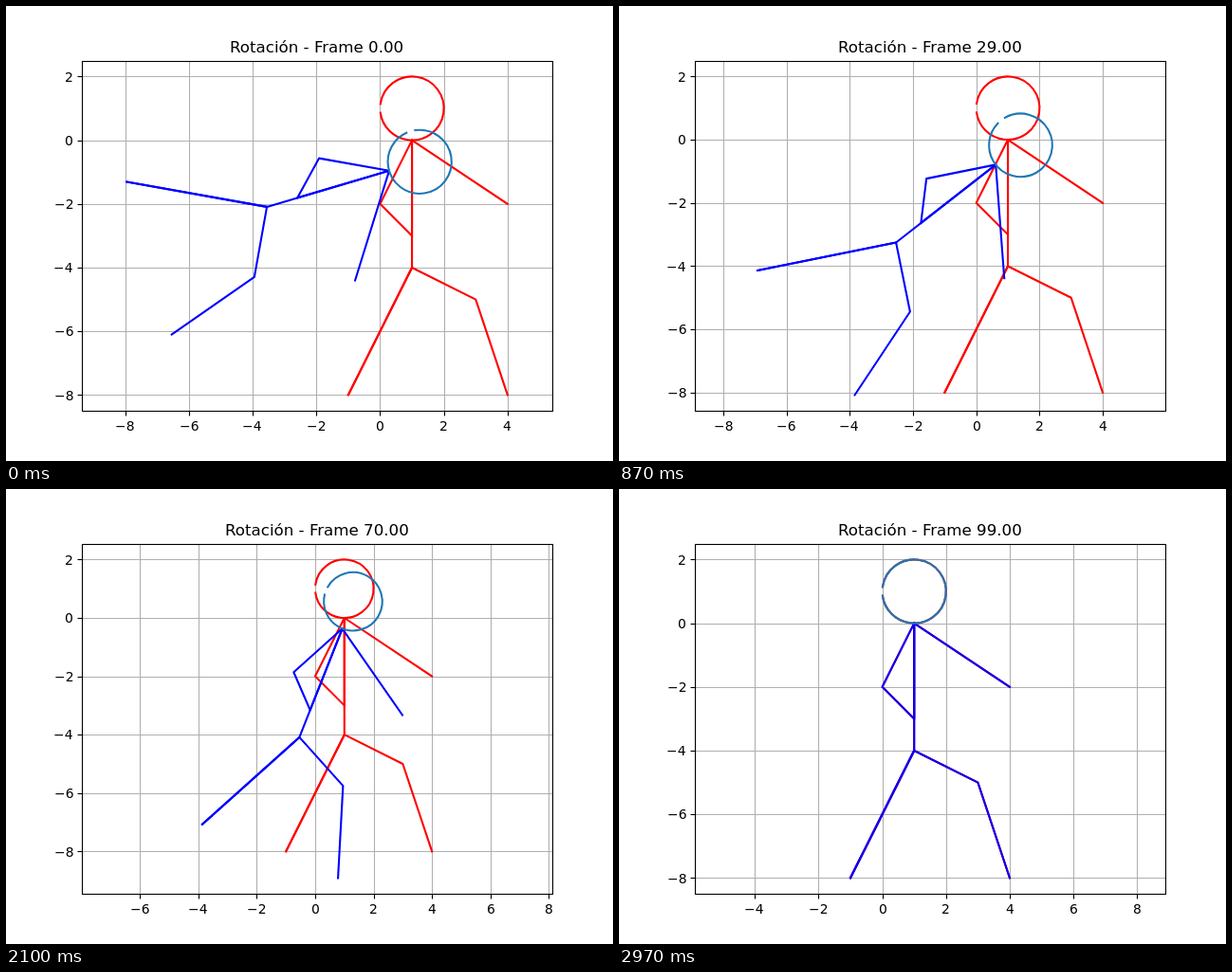
Write an HTML page with a canvas that moves like this. It is 640 px wide and 480 px high and loops after 3 s.

```html
<!DOCTYPE html>
<html lang="es">
<head>
<meta charset="utf-8">
<title>Rotación</title>
<style>
  html, body { margin: 0; width: 100%; height: 100%; overflow: hidden; background: #fff; }
  canvas { display: block; }
</style>
</head>
<body>
<canvas id="stage" width="640" height="480"></canvas>
<script>
const ctx = document.getElementById('stage').getContext('2d');

const FRAMES = 100, STEP = 30;
const START = -73.55 * Math.PI / 180;
const BOX = { l: 80, r: 576, t: 57.6, b: 427.2 };
const PT = 100 / 72;
const FONT = '"DejaVu Sans", sans-serif';

const HAND = [4, -2], NECK = [1, 0], ELBOW = [0, -2], WRIST = [1, -3];
const HIP = [1, -4], FOOT = [-1, -8], KNEE = [3, -5], TOE = [4, -8];
const BODY = [HAND, NECK, ELBOW, WRIST, NECK, HIP, FOOT, HIP, KNEE, TOE];
const RETRACED = [[NECK, WRIST], [HIP, FOOT]];

const rotate = a => ([x, y]) => [
  x * Math.cos(a) - y * Math.sin(a),
  x * Math.sin(a) + y * Math.cos(a)
];

const snap = v => Math.floor(v + 0.5) + 0.5;

// Equal-aspect view: height fits the data, width is centred on it.
function makeView(points) {
  const xs = points.map(p => p[0]), ys = points.map(p => p[1]);
  const low = Math.min(...ys), high = 2;
  const pad = (high - low) * 0.05;
  const scale = (BOX.b - BOX.t) / (high - low + 2 * pad);
  const midX = (Math.min(...xs) + Math.max(...xs)) / 2;
  const mid = (BOX.l + BOX.r) / 2, half = (BOX.r - BOX.l) / 2 / scale;
  return {
    scale,
    x: v => mid + (v - midX) * scale,
    y: v => BOX.t + (high + pad - v) * scale,
    xTicks: evens(midX - half, midX + half),
    yTicks: evens(low - pad, high + pad)
  };
}

function evens(from, to) {
  const out = [];
  for (let v = Math.ceil(from / 2) * 2; v <= to; v += 2) out.push(v);
  return out;
}

function line(x1, y1, x2, y2) {
  ctx.beginPath();
  ctx.moveTo(x1, y1);
  ctx.lineTo(x2, y2);
  ctx.stroke();
}

// Places text by its inked width; align 0.5 centres it, 1 ends it at x.
function label(str, x, y, size, align) {
  ctx.font = `${size * PT}px ${FONT}`;
  const m = ctx.measureText(str);
  const w = m.actualBoundingBoxLeft + m.actualBoundingBoxRight;
  ctx.fillText(str, Math.round(x - w * align) + m.actualBoundingBoxLeft, Math.round(y));
}

const tickText = v => (v < 0 ? '\u2212' : '') + Math.abs(v);

function drawGrid(view) {
  ctx.lineWidth = 0.8 * PT;
  ctx.lineCap = 'butt';
  const top = snap(BOX.t), bottom = snap(BOX.b), left = snap(BOX.l), right = snap(BOX.r);
  for (const v of view.xTicks) {
    const x = snap(view.x(v));
    ctx.strokeStyle = '#b0b0b0';
    line(x, top, x, bottom);
    ctx.strokeStyle = '#000';
    line(x, bottom, x, bottom + 5);
    label(tickText(v), view.x(v), BOX.b + 20.7, 10, 0.5);
  }
  for (const v of view.yTicks) {
    const y = snap(view.y(v));
    ctx.strokeStyle = '#b0b0b0';
    line(left, y, right, y);
    ctx.strokeStyle = '#000';
    line(left, y, left - 5, y);
    label(tickText(v), BOX.l - 7 * PT, view.y(v) + 5.2, 10, 1);
  }
}

function drawBox() {
  ctx.strokeStyle = '#000';
  ctx.lineWidth = 0.8 * PT;
  const l = snap(BOX.l), t = snap(BOX.t);
  ctx.lineJoin = 'miter';
  ctx.strokeRect(l, t, snap(BOX.r) - l, snap(BOX.b) - t);
}

function drawPath(points, view) {
  ctx.beginPath();
  for (const [x, y] of points) ctx.lineTo(view.x(x), view.y(y));
  ctx.stroke();
}

function drawBody(view, turn, color) {
  ctx.strokeStyle = color;
  for (const part of [BODY, ...RETRACED]) drawPath(part.map(turn), view);
}

function drawHead(view, angle, color) {
  const [x, y] = rotate(angle)([1, 1]);
  ctx.strokeStyle = color;
  ctx.beginPath();
  ctx.arc(view.x(x), view.y(y), view.scale, -3 - angle, 3 - angle);
  ctx.stroke();
}

function draw(n) {
  const angle = START * (1 - n / (FRAMES - 1));
  const turn = rotate(angle), still = rotate(0);
  const view = makeView([...BODY, ...BODY.map(turn)]);

  ctx.fillStyle = '#fff';
  ctx.fillRect(0, 0, 640, 480);
  ctx.fillStyle = '#000';
  drawGrid(view);

  ctx.lineWidth = 1.5 * PT;
  ctx.lineCap = 'square';
  ctx.lineJoin = 'round';
  drawBody(view, still, '#f00');
  drawHead(view, 0, '#f00');
  drawBody(view, turn, '#00f');
  drawHead(view, angle, '#1f77b4');

  drawBox();
  label(`Rotación - Frame ${n.toFixed(2)}`, (BOX.l + BOX.r) / 2, BOX.t - 6 * PT, 12, 0.5);
}

function tick() {
  draw(Math.floor(performance.now() / STEP) % FRAMES);
  requestAnimationFrame(tick);
}
tick();
</script>
</body>
</html>
```
